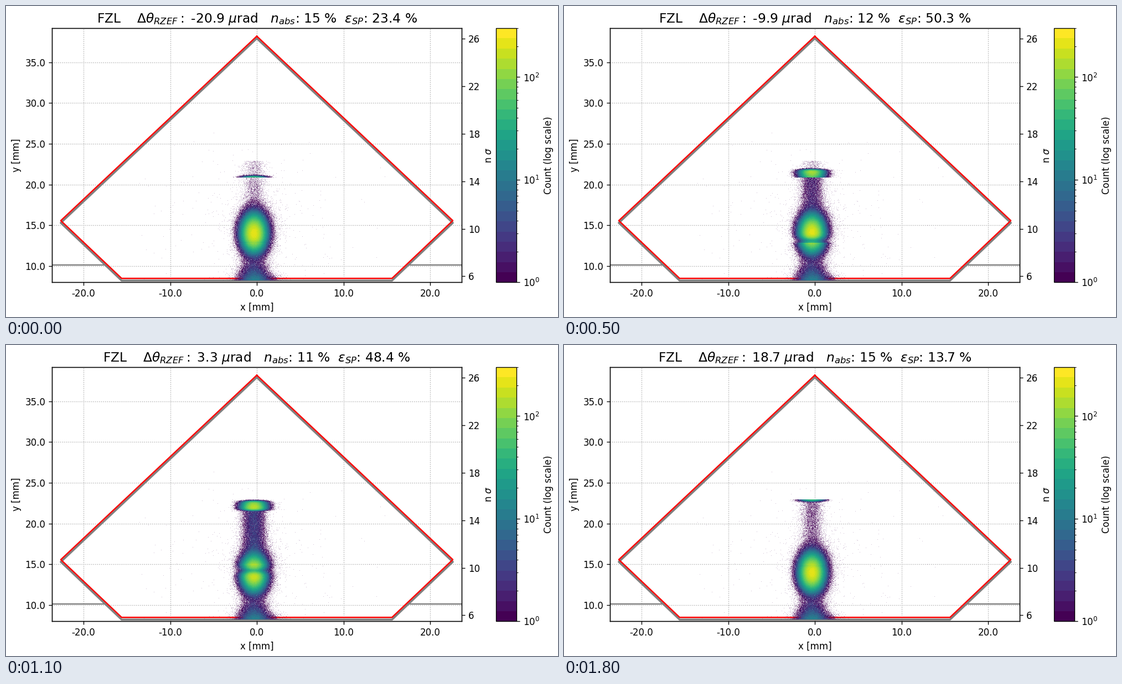
Recreate the animation shown at these times as a matplotlib script. Size 997 by 562 pixels, loop 1900 ms.

```python
import numpy as np
import matplotlib.pyplot as plt
from matplotlib.animation import FuncAnimation
from matplotlib.cm import ScalarMappable
from matplotlib.colors import LogNorm
from matplotlib.ticker import FormatStrFormatter

W, H, DPI = 997, 562, 120
LEFT, RIGHT, TOP, BOTTOM = 83, 823, 40, 499.4
STEPS = 19

plt.rcParams["font.family"] = "DejaVu Sans"


def to_x(px):
    return (px - 453) / 15.65


def to_y(px):
    return 10 + (470.1 - px) / 14.74


def box(left, right):
    return [left / W, 1 - BOTTOM / H, (right - left) / W, (BOTTOM - TOP) / H]


fig = plt.figure(figsize=(W / DPI, H / DPI), dpi=DPI, facecolor="white")
ax = fig.add_axes(box(LEFT, RIGHT))
cax = fig.add_axes(box(885.4, 922.4))

# Static outlines
shape_x = np.array([0, -22.62, -15.6, 15.6, 22.62, 0])
shape_y = np.array([38.19, 15.58, 8.5, 8.5, 15.58, 38.19])
for x0, x1 in ((-30, -17.5), (17.5, 30)):
    ax.plot([x0, x1], [10.17, 10.17], color="gray", lw=1.4)
ax.plot(shape_x, shape_y - 0.27, color="gray", lw=2.2)
ax.plot(shape_x, shape_y, color="red", lw=1.5)

# Histogram bins are half a pixel wide
C0, C1, R0, R1 = 225, 685, 225, 496
px, py = np.meshgrid(np.arange(C0, C1, 0.5) + 0.25,
                     np.arange(R0, R1, 0.5) + 0.25)
rng = np.random.default_rng(7)
chance = rng.random(px.shape)
jitter = rng.normal(size=px.shape)

cmap = plt.get_cmap("viridis", 25)
norm = LogNorm(1, 300)


def blob(amp, cx, cy, sx, sy):
    return amp * np.exp(-0.5 * (((px - cx) / sx) ** 2 + ((py - cy) / sy) ** 2))


halo = (blob(0.0018, 450, 385, 90, 75) + blob(0.018, 452, 395, 28, 42)
        + blob(1.9, 452, 408, 15, 24))
tail = blob(9, 448, 505, 12, 22) + blob(5, 453, 499, 17, 8)


def density(angle):
    """Expected count per bin for one crystal angle."""
    strength = np.exp(-((angle - 1) / 12) ** 2)

    # Main beam with the slice that the crystal removes
    sy = np.where(py < 411, 15.6 - 1.8 * strength, 15)
    core = blob(220, 447.8, 411, 10.2, sy)
    slot = np.exp(-0.5 * ((py - 411.5 + 1.25 * angle) / 5.5) ** 2)
    slot *= (py > 398) & (py < 428)
    core *= 1 - 0.8 * slot

    # Deflected slice
    mid = 293.6 - 1.07 * angle
    window = np.exp(-(np.abs(py - mid) / 7.8) ** 5)
    window *= (py > 279) & (py < 310)
    beam = np.exp(-0.5 * ((py - 295) / 11) ** 2)
    across = (150 * np.exp(-0.5 * ((px - 447.8) / 10.2) ** 2)
              + np.exp(-0.5 * ((px - 453) / 14) ** 2))
    band = window * beam * across

    # Particles lost between the two
    column = np.exp(-0.5 * ((px - 448) / 10) ** 2) * (py < 411)
    streak = column * (0.25 * (py > 280) + 3 * strength * (py > max(mid, 280)))
    return halo + tail + core + band + streak


def heat(angle):
    lam = density(angle)
    spread = 0.7 * np.sqrt(lam) * np.minimum(lam, 1)
    count = np.floor(lam + spread * jitter + chance)
    rgba = cmap(norm(np.clip(count, 1, 299)))
    rgba[..., 3] = count >= 1

    # Average each 2 x 2 block, weighting colour by coverage
    rgba[..., :3] *= rgba[..., 3:]
    rows, cols = R1 - R0, C1 - C0
    out = rgba.reshape(rows, 2, cols, 2, 4).mean(axis=(1, 3))
    out[..., :3] /= np.maximum(out[..., 3:], 0.25)
    return np.clip(out, 0, 1)


image = ax.imshow(heat(-20.9), aspect="auto", interpolation="nearest", zorder=3,
                  extent=(to_x(C0), to_x(C1), to_y(R1), to_y(R0)))

# Axes, ticks and labels
ax.set_xlim(to_x(LEFT), to_x(RIGHT))
ax.set_ylim(to_y(BOTTOM), to_y(TOP))
ax.set_xticks(range(-20, 21, 10))
ax.set_yticks(range(10, 36, 5))
for axis in (ax.xaxis, ax.yaxis):
    axis.set_major_formatter(FormatStrFormatter("%.1f"))
ax.grid(ls=":", color="#a8a8a8", lw=0.8)
ax.set_axisbelow(True)
ax.set_xlabel("x [mm]")
ax.set_ylabel("y [mm]")

sigma = ax.twinx()
sigma.set_ylim(5.49, 26.89)
sigma.set_yticks(range(6, 27, 4))
sigma.set_ylabel(r"n $\sigma$")

fig.colorbar(ScalarMappable(norm, cmap), cax=cax, label="Count (log scale)")

title = ax.set_title("", fontsize=14)

ABSORBED = ([0, 2, 5, 9, 11, 15, 18], [15, 14, 12, 11, 11, 13, 15])
EFFICIENCY = ([0, 1, 2, 3, 4, 5, 7, 9, 11, 13, 14, 15, 16, 17, 18],
              [23.4, 33.2, 41.5, 45.9, 48.8, 50.3, 49.7, 48.8, 48.4, 45.1,
               42.0, 37.9, 31.6, 23.2, 13.7])


def draw(i):
    angle = -20.9 + 2.2 * i
    absorbed = np.interp(i, *ABSORBED)
    eff = np.interp(i, *EFFICIENCY)
    title.set_text(
        rf"FZL    $\Delta\theta_{{RZEF}}:$ {angle:.1f} $\mu$rad   "
        rf"$n_{{abs}}$: {absorbed:.0f} %  $\epsilon_{{SP}}$: {eff:.1f} %")
    image.set_data(heat(angle))
    return image, title


anim = FuncAnimation(fig, draw, frames=STEPS, interval=100, repeat=True,
                     repeat_delay=0, blit=False)
plt.show()
```
